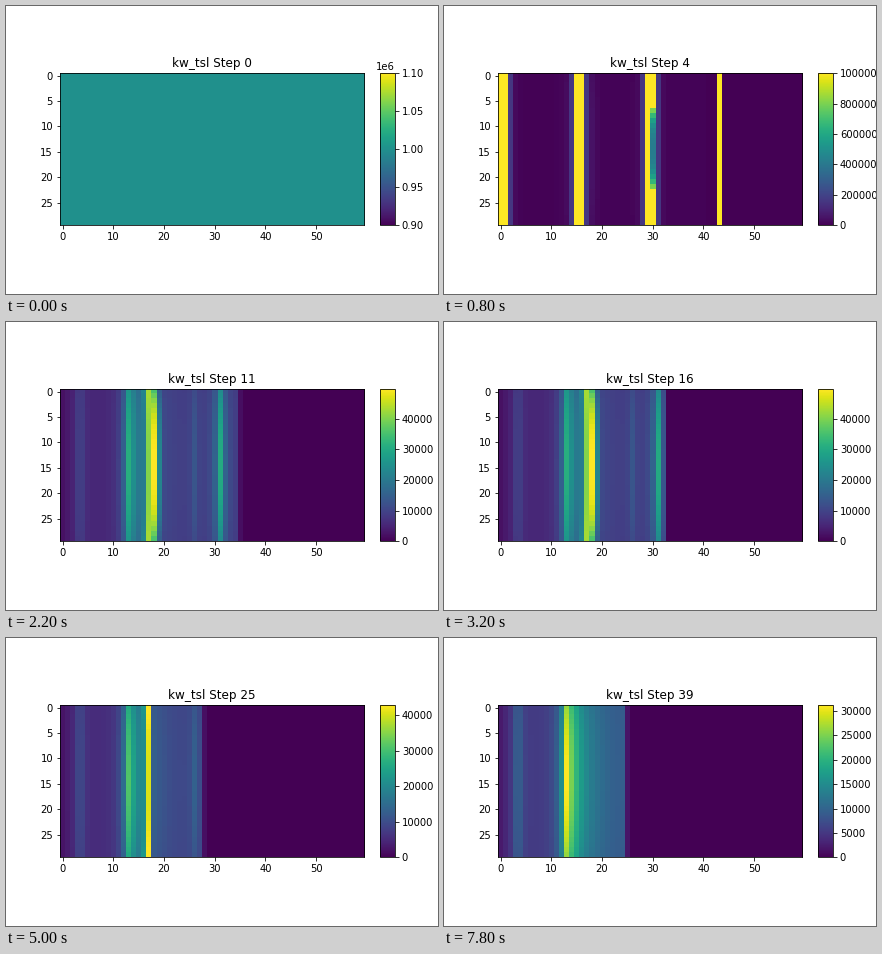
A matplotlib script that plays this animation: 432 px wide and 288 px high, repeating every 8000 ms.

```python
import numpy as np
import matplotlib.pyplot as plt
from matplotlib.animation import FuncAnimation
from matplotlib.ticker import MaxNLocator

W, H, DPI = 432, 288, 72
ROWS, COLS, STEPS = 30, 60, 40
FULL = 1e6

plt.rcParams.update({"font.family": "DejaVu Sans", "font.size": 10,
                     "axes.titlesize": 12})

col = np.arange(COLS)
dist = np.abs(np.arange(ROWS) - 14.5)[:, None]
off = dist / 14.5  # 0 at mid height, 1 at the top and bottom rows

# Ridges left behind: centre, left and right decay, height, loss at the ends
RIDGES = [(3.5, 0.7, 0.7, 8000, 0.2),
          (13, 1, 3.3, 24770, 0.2),
          (26, 0.8, 0.8, 4500, 0.4),
          (31, 0.9, 0.9, 22000, 0.3)]

# Initial bands that drain last: centre and half width
BANDS = [(0.5, 0.5), (15.5, 0.5), (29.5, 0.5), (43, 0)]


def ridge(centre, left, right, height, loss):
    d = col - centre
    decay = np.exp(-np.abs(d) / np.where(d < 0, left, right))
    return height * decay * (1 - loss * off ** 2)


def crest(s):
    """Sharp peak that bends left at its ends and is cut away from the right."""
    bend = off ** 3
    centre = 17.724 - 0.367 * bend
    height = 38860 * (1 - 0.156 * bend)
    edge = np.interp(s, [18, 24, 25, 31, 39], [20, 19, 18, 17, 16])
    keep = np.clip(edge - col, 0, 1)
    return height * np.exp(-(col - centre) ** 2 / 1.28) * keep


def settled(s):
    floor = np.interp(col, [0, 3, 9, 20, 35], [2200, 5000, 5500, 8000, 8500])
    load = floor + sum(ridge(*r) for r in RIDGES) + crest(s)
    front = np.interp(s, [0, 11, 18, 22, 25, 31, 39],
                      [45, 35, 32, 31, 28, 26, 25])
    load = load * np.clip(front - col, 0, 1)
    return np.where(col <= front, np.maximum(load, 1800), 0)


def draining(s):
    part = np.zeros((ROWS, COLS))
    for centre, half in BANDS:
        gap = np.abs(col - centre) - half - 1.5 * max(4 - s, 0)
        fringe = 0.32 * half * np.exp(1.8 * (1 - gap))
        part = np.maximum(part, np.where(gap < 1, np.clip(1 - gap, 0, 1), fringe))
    if s >= 4:
        d = dist[:, 0]
        part[:, 30] = np.where(d < 8, 0.42 + 0.38 * (d / 7.5) ** 3, 1)
    return FULL * part * 0.62 ** max(s - 4, 0)


def field(s):
    if s == 0:
        return np.full((ROWS, COLS), FULL)
    if s < 11:
        return np.maximum(settled(s), draining(s))
    return settled(s)


def add_axes(x, top, w, h):
    return fig.add_axes([x / W, 1 - (top + h) / H, w / W, h / H])


fig = plt.figure(figsize=(W / DPI, H / DPI), dpi=DPI, facecolor="white")
width = 334.8 / 1.1
height = width / 2
top = 143.28 - height / 2
ax = add_axes(54, top, width, height)
cax = add_axes(54 + 1.05 * width, top, 0.05 * width, height)

im = ax.imshow(field(0), cmap="viridis", aspect="auto",
               vmin=0.9 * FULL, vmax=1.1 * FULL)
ax.set_xticks(range(0, 60, 10))
ax.set_yticks(range(0, 30, 5))
bar = fig.colorbar(im, cax=cax)
scale = fig.text(388.8 / W, 1 - (top - 3) / H, "1e6", ha="right", va="baseline")
locator = MaxNLocator(7, steps=[1, 2, 2.5, 5, 10])


def draw(s):
    data = field(s)
    im.set_data(data)
    if s == 0:
        im.set_clim(0.9 * FULL, 1.1 * FULL)
        ticks = np.linspace(0.9, 1.1, 5)
        bar.set_ticks(ticks * FULL, labels=[f"{t:.2f}" for t in ticks])
    else:
        peak = data.max()
        im.set_clim(0, peak)
        ticks = [t for t in locator.tick_values(0, peak) if 0 <= t <= peak + 1e-6]
        bar.set_ticks(ticks, labels=[f"{t:.0f}" for t in ticks])
        cax.set_ylim(0, peak)
    scale.set_visible(s == 0)
    ax.set_title(f"kw_tsl Step {s}")
    return []


anim = FuncAnimation(fig, draw, frames=STEPS, interval=200,
                     init_func=lambda: draw(0), repeat=True, repeat_delay=0)
plt.show()
```
